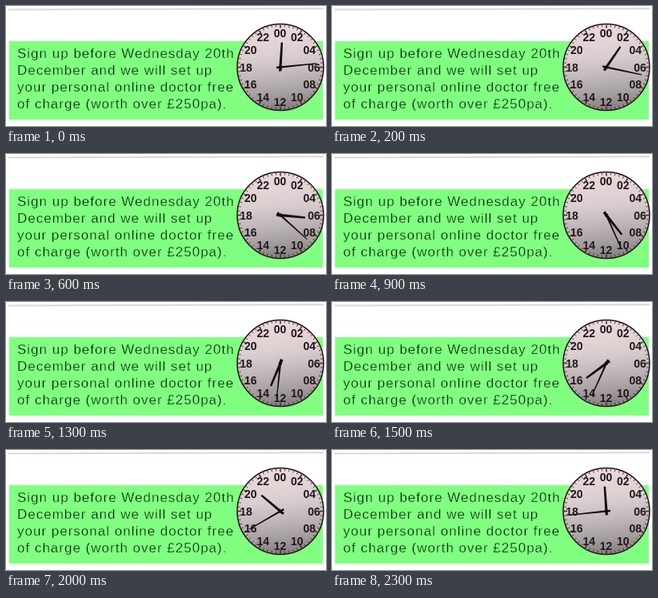
These frames come from a looping animation (400 px wide and 150 px high, 2.4 s). An HTML page:

```html
<!DOCTYPE html>
<html lang="en">
<head>
<meta charset="utf-8">
<title>Doctor offer with clock</title>
<style>
  html, body { margin: 0; width: 100%; height: 100%; overflow: hidden; background: #fff; }
  svg { display: block; width: 400px; height: 150px; }
  .copy { font: 17px "Liberation Sans", Arial, sans-serif; letter-spacing: 1px; fill: #04200a; stroke: #80ff80; stroke-width: .35px; }
  .hours { font: bold 14px "Liberation Sans", Arial, sans-serif; text-anchor: middle; fill: #201819; }
</style>
</head>
<body>
<svg viewBox="0 0 400 150">
  <defs>
    <linearGradient id="face" x1=".45" y1="0" x2=".55" y2="1">
      <stop offset="0" stop-color="#ecd9db"/>
      <stop offset=".35" stop-color="#dccfd1"/>
      <stop offset=".55" stop-color="#c6bdc0"/>
      <stop offset=".8" stop-color="#a69fa2"/>
      <stop offset="1" stop-color="#857e81"/>
    </linearGradient>
  </defs>
  <path d="M3 4.6L397 3.3" stroke="#d8d8d8" stroke-width="2"/>
  <path d="M4 44H396V142H4Z" fill="#80ff80"/>
  <g class="copy">
    <text x="14" y="64.5">Sign up before Wednesday 20th</text>
    <text x="14" y="85.5">December and we will set up</text>
    <text x="14" y="106.5">your personal online doctor free</text>
    <text x="14" y="127.5">of charge (worth over £250pa).</text>
  </g>
  <g transform="translate(343 76.5)">
    <circle r="54" fill="url(#face)" stroke="#1c1013" stroke-width="1.5"/>
    <g id="ticks" stroke="#3a1a1e"></g>
    <g id="labels" class="hours"></g>
    <g fill="#150c0d">
      <path id="minute" d="M-1.2 5L-.6 -45H.6L1.2 5Z"/>
      <path id="hour" d="M-1.7 5L-1.2 -31H1.2L1.7 5Z"/>
      <circle r="2.2"/>
    </g>
  </g>
</svg>
<script>
  const LOOP = 2400, STEP = 100;
  const byId = id => document.getElementById(id);

  function add(parent, name, attrs, text = "") {
    const node = document.createElementNS("http://www.w3.org/2000/svg", name);
    for (const key in attrs) node.setAttribute(key, attrs[key]);
    node.textContent = text;
    parent.append(node);
  }

  for (let i = 0; i < 60; i++) {
    const major = i % 5 === 0;
    add(byId("ticks"), "path", {
      d: `M0 -53V${major ? -49 : -50.5}`,
      "stroke-width": major ? 1.4 : 0.8,
      transform: `rotate(${i * 6})`
    });
  }

  for (let i = 0; i < 12; i++) {
    const angle = i * Math.PI / 6;
    add(byId("labels"), "text", {
      x: 42.5 * Math.sin(angle) - 0.5,
      y: 5 - 43 * Math.cos(angle)
    }, String(i * 2).padStart(2, "0"));
  }

  function turn(id, angle) {
    byId(id).setAttribute("transform", `rotate(${angle})`);
  }

  // A 24-hour dial running from 00:14 to 23:44, one hour per step.
  function draw(time) {
    const hour = Math.floor((time % LOOP) / STEP);
    const minute = Math.round(14 + hour * 30 / 23);
    turn("minute", minute * 6);
    turn("hour", (hour + minute / 60) * 15);
  }

  const start = performance.now();
  function tick() {
    draw(performance.now() - start);
    requestAnimationFrame(tick);
  }
  tick();
</script>
</body>
</html>
```
